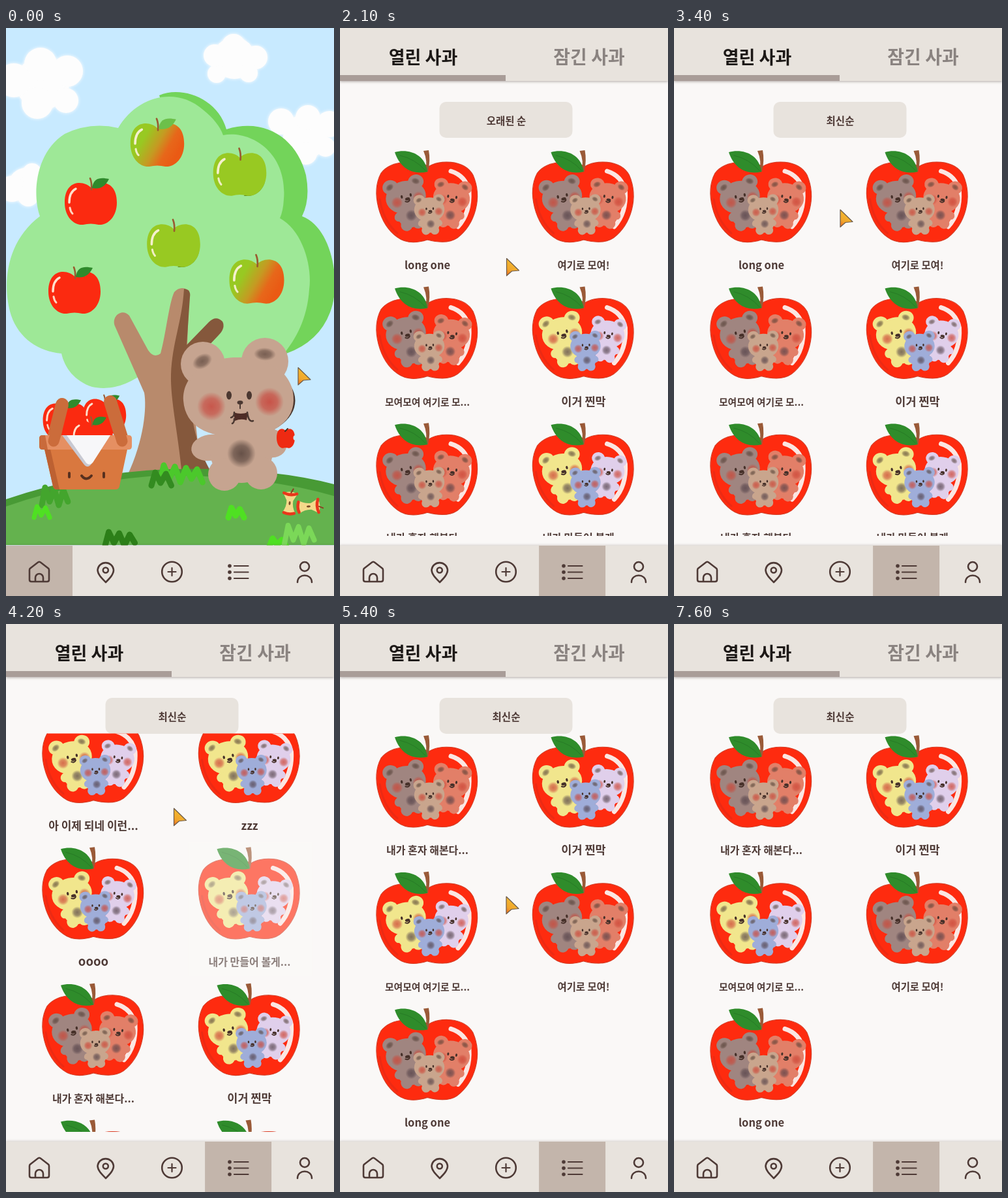
Write an HTML page with a canvas that moves like this. It is 503 px wide and 869 px high and loops after 7700 ms.

```html
<!DOCTYPE html>
<html lang="ko">
<head>
<meta charset="utf-8">
<title>사과나무</title>
<style>
html, body { margin: 0; width: 100%; height: 100%; overflow: hidden; background: #faf8f7; }
canvas { display: block; }
</style>
</head>
<body>
<canvas id="stage" width="503" height="869"></canvas>
<script>
const g = document.getElementById('stage').getContext('2d');
const LOOP = 7700, STEP = 100, TAU = Math.PI * 2;
const INK = '#4e3a36', PANEL = '#e8e3dd', PAGE = '#faf8f7';
const FONT = '"Noto Sans CJK KR", "Noto Sans", sans-serif';

function fill(d, color) { g.fillStyle = color; g.fill(new Path2D(d)); }

function line(d, color, width) {
  g.strokeStyle = color;
  g.lineWidth = width;
  g.lineCap = g.lineJoin = 'round';
  g.stroke(new Path2D(d));
}

function oval(x, y, rx, ry, color, rot = 0) {
  g.beginPath();
  g.ellipse(x, y, rx, ry, rot, 0, TAU);
  g.fillStyle = color;
  g.fill();
}

function ring(x, y, r, width) {
  g.beginPath();
  g.arc(x, y, r, 0, TAU);
  g.strokeStyle = INK;
  g.lineWidth = width;
  g.stroke();
}

// Blurred spot; rgb is "r,g,b"
function soft(x, y, rx, ry, rgb, alpha, rot = 0) {
  at(x, y, () => {
    g.rotate(rot);
    g.scale(rx, ry);
    const s = g.createRadialGradient(0, 0, 0, 0, 0, 1);
    s.addColorStop(0, `rgba(${rgb},${alpha})`);
    s.addColorStop(0.55, `rgba(${rgb},${alpha * 0.75})`);
    s.addColorStop(1, `rgba(${rgb},0)`);
    oval(0, 0, 1, 1, s);
  });
}

function at(x, y, draw) {
  g.save();
  g.translate(x, y);
  draw();
  g.restore();
}

function text(str, x, y, size, weight, color) {
  g.font = `${weight} ${size}px ${FONT}`;
  g.textAlign = 'center';
  g.textBaseline = 'alphabetic';
  g.fillStyle = color;
  g.fillText(str, x, y);
}

// ---- home page ----
function cloud(...puffs) {
  g.save();
  g.shadowColor = '#fdfdfd';
  g.shadowBlur = 5;
  for (const [x, y, r] of puffs) oval(x, y, r, r, '#fdfdfd');
  g.restore();
}

const APPLE = 'M0,-25 C10,-36 40,-38 40,-2 C40,20 26,33 12,32 Q0,29 -12,32 C-26,33 -40,20 -40,-2 C-40,-38 -10,-36 0,-25Z';

function apple(x, y, color, leaf, scale = 1) {
  at(x, y, () => {
    g.scale(scale, scale);
    let paint = color;
    if (color === 'mixed') {
      paint = g.createLinearGradient(-28, -16, 28, 16);
      paint.addColorStop(0.15, '#98c922');
      paint.addColorStop(0.5, '#c59a22');
      paint.addColorStop(0.75, '#e7671a');
      paint.addColorStop(1, '#ea5a14');
    }
    if (color === '#98c922') fill('M6,32 C26,35 36,20 38,10 L34,5Z', '#5c8a1c');
    fill(APPLE, paint);
    line('M1,-22 Q2,-32 -1,-39', '#9a5a30', 2.6);
    if (leaf) fill('M2,-24 C4,-42 18,-40 28,-38 C22,-26 14,-22 2,-24Z', leaf);
    line('M-33,-2 Q-33,-18 -23,-23', 'rgba(255,244,225,.9)', 3.5);
    line('M-32,6 Q-31,12 -28,15', 'rgba(255,244,225,.85)', 3);
  });
}

function tuft(x, y, w, h, n, color, width) {
  let d = `M${x},${y + h}`;
  for (let i = 0; i < n; i++) {
    const a = x + w * (i + 0.35) / n, b = x + w * (i + 0.85) / n;
    d += ` L${a},${y + i * 2} L${b},${y + h * (0.8 + i % 2 * 0.2)}`;
  }
  line(d, color, width);
}

function tree() {
  fill('M235,103 C270,88 325,108 338,155 C400,136 447,172 460,225 Q467,262 454,288 C500,305 515,390 497,435 Q480,480 430,498 L380,500 L300,300Z', '#73d45a');
  fill('M172,153 C200,105 260,88 302,125 C318,138 328,150 333,164 C375,156 432,190 426,262 Q425,280 420,291 C455,310 470,365 465,400 C462,445 445,475 425,500 L280,520 L215,525 C180,553 150,553 132,549 C105,540 90,520 85,498 C50,495 20,475 8,440 C-5,400 -4,330 52,288 C40,255 45,190 90,162 Q130,143 172,153Z', '#9ee897');
  fill('M186,685 C212,630 216,580 212,558 L167,456 C161,440 179,428 189,440 L218,493 Q227,506 237,498 C245,470 250,420 258,404 Q268,393 281,402 L278,484 L300,690Z', '#b88a6c');
  fill('M273,399 Q284,400 282,412 L277,485 L311,450 Q322,439 332,449 Q337,459 326,470 L290,508 Q276,540 283,580 C290,630 300,655 318,685 L270,685 C264,620 252,570 253,530 C255,480 270,450 273,399Z', '#85583c');
}

function basket() {
  apple(91, 602, '#fb2a10', '#2f8a2c', 0.86);
  apple(151, 594, '#fb2a10', '#2f8a2c', 0.83);
  apple(131, 627, '#fb2a10', '#2f8a2c', 0.82);
  line('M86,576 L73,628', '#cb6c3b', 20);
  line('M160,572 L177,626', '#cb6c3b', 20);
  fill('M58,640 H187 L174,701 Q173,706 168,706 H78 Q73,706 72,701Z', '#d9783f');
  fill('M58,640 H67 L82,706 H78 Q73,706 72,701Z', '#bd6132');
  fill('M56,623 H188 Q193,623 193,628 V640 Q193,645 188,645 H56 Q51,645 51,640 V628 Q51,623 56,623Z', '#e58f62');
  fill('M51,640 V628 Q51,623 56,623 H60 L64,645 H56 Q51,645 51,640Z', '#c96a3b');
  line('M78,615 L73,632', '#cb6c3b', 17);
  line('M172,612 L178,632', '#cb6c3b', 17);
  fill('M86,623 H160 L131,667 Q125,675 119,667Z', '#c8c9d2');
  fill('M93,623 H160 L133,665 Q127,671 122,664Z', '#f7f7f9');
  line('M97,681 V687 M150,681 V687', '#57301f', 4);
  line('M116,685 Q123,694 131,685', '#57301f', 4);
}

function bigBear() {
  const fur = '#c6a490', dark = '#4b3831';
  oval(359, 570, 84.5, 56, '#49352c');
  oval(302, 514, 34, 34, fur);
  oval(397, 510, 36, 36, fur);
  fill('M272,570 C270,530 310,503 356,504 C405,503 443,530 441,570 C440,605 405,626 357,626 C310,626 275,610 272,570Z', fur);
  oval(313, 642, 29, 20, fur, -0.15);
  oval(405, 635, 26, 22, fur, 0.3);
  oval(361, 648, 48, 48, fur);
  oval(335, 683, 25, 25, fur);
  oval(391, 681, 25, 25, fur);
  soft(301, 510, 16, 11, '95,72,62', 0.75, -0.5);
  soft(397, 499, 17, 10, '95,72,62', 0.75, 0.05);
  soft(315, 579, 22, 22, '200,74,64', 0.85);
  soft(404, 572, 22, 22, '200,74,64', 0.9);
  soft(361, 651, 22, 22, '92,72,64', 0.9);
  oval(342, 562, 4, 6.5, dark);
  oval(373, 562, 4, 6.5, dark);
  oval(359, 573, 4.5, 3, dark);
  line('M359,574 V582', dark, 2);
  fill('M349,588 Q360,592 371,588 L369,600 Q360,597 351,601Z', '#4e2c26');
  line('M345,596 Q350,595 350,588 M350,598 Q350,604 347,605', dark, 2.5);
  line('M370,588 Q372,604 379,601', dark, 2.5);
  at(429, 628, () => {
    g.scale(0.35, 0.46);
    fill(APPLE, '#ee2a12');
  });
  oval(444, 627, 3.5, 4, '#c8eaff');
  line('M428,617 L432,613', '#4b2c20', 2);
}

function core(x, y, rot) {
  at(x, y, () => {
    g.rotate(rot);
    fill('M-11,-15 Q0,-20 11,-15 L5,-4 Q4,6 10,15 Q0,20 -10,15 Q-4,5 -5,-4Z', '#f5d98a');
    line('M-10,-15 Q0,-11 10,-15', '#e9371b', 4.5);
    line('M-8,15 Q0,18 8,15', '#e9371b', 4.5);
    oval(0, 0, 1.5, 3, '#7a4a26');
    line('M1,-16 L4,-22', '#8c3f22', 2);
  });
}

function home() {
  g.fillStyle = '#c8eaff';
  g.fillRect(0, 0, 503, 869);
  cloud([56, 84, 41], [53, 55, 25], [94, 66, 24], [92, 111, 19], [48, 115, 24], [12, 80, 26]);
  cloud([350, 46, 32], [349, 27, 18], [383, 45, 18], [372, 69, 14], [323, 70, 14], [320, 42, 17]);
  cloud([459, 166, 34], [463, 137, 19], [422, 143, 20], [496, 147, 20], [460, 192, 17], [490, 182, 15]);
  cloud([30, 240, 26], [40, 222, 15], [9, 246, 20], [34, 257, 16]);
  tree();
  apple(232, 179, 'mixed', '#6cc04a', 1.03);
  apple(358.5, 224, '#98c922', null, 1.02);
  apple(130, 269, '#fb2a10', '#2f8a2c');
  apple(257, 333, '#98c922', null, 1.02);
  apple(384.5, 388, 'mixed', null, 1.05);
  apple(105, 405, '#fb2a10', '#2f8a2c');

  fill('M0,721 Q120,680 250,675 Q400,671 503,698 V791 H0Z', '#489a35');
  fill('M0,732 Q120,690 250,684 Q400,686 503,716 V791 H0Z', '#64b24e');
  tuft(236, 669, 68, 26, 4, '#4bc82b', 9);
  tuft(223, 680, 33, 20, 2, '#338b20', 9);
  tuft(55, 703, 42, 27, 3, '#43a52d', 9);
  tuft(43, 732, 26, 17, 2, '#4fe022', 7);
  tuft(341, 734, 26, 15, 2, '#4fe022', 9);
  tuft(152, 771, 48, 21, 3, '#2c7f18', 9);
  tuft(404, 781, 28, 12, 2, '#4fe022', 9);
  tuft(427, 761, 48, 28, 3, '#7bd858', 8);
  basket();
  bigBear();
  core(435, 727, 0.08);
  core(464, 732, 1.5);
}

// ---- list page ----
function bear(x, y, scale, rot, color) {
  at(x, y, () => {
    g.rotate(rot);
    g.scale(scale, scale);
    oval(-20, -20, 12, 11, color);
    oval(20, -20, 12, 11, color);
    oval(0, 0, 31, 25, color);
    oval(1, 27, 20, 20, color);
    oval(-16, 27, 8, 7, color, -0.5);
    oval(18, 27, 8, 7, color, 0.5);
    oval(-8, 42, 9, 9, color);
    oval(10, 42, 9, 9, color);
    soft(-21, -20, 7, 5, '80,60,50', 0.65, -0.5);
    soft(20, -21, 7, 5, '80,60,50', 0.65, 0.5);
    soft(-15, 5, 9, 9, '205,70,55', 0.75);
    soft(19, 4, 9, 9, '205,70,55', 0.75);
    soft(2, 29, 9, 9, '80,62,70', 0.7);
    oval(-6, -2, 1.7, 2.6, '#463029');
    oval(8, -2, 1.7, 2.6, '#463029');
    oval(2, 3, 3.8, 2.3, '#463029');
    line('M-2,6 Q2,9 5,5', '#463029', 2);
  });
}

const FURS = { b: ['#a08580', '#e27f68', '#c9a58d'], y: ['#f1e68d', '#e0cfeb', '#9fadd9'] };

function card(kind) {
  const [left, right, front] = FURS[kind];
  const body = 'M136,212 C150,202 190,200 204,225 C219,260 207,300 180,321 C167,330 150,328 134,324 C115,330 100,329 88,320 C60,300 47,252 63,222 C80,200 120,203 136,212Z';
  fill(body, '#fe2b0f');
  line(body, '#d83a22', 1.2);
  line('M61,262 Q66,295 88,314', '#ec2a14', 3);
  line('M170,219 Q193,226 198,250 Q200,283 181,304', '#fbe6e2', 7);
  fill('M128,188 L136,187 Q139,203 135,220 L131,220 Q135,204 128,188Z', '#9a5a38');
  fill('M84,190 C105,184 131,193 134,220 C110,225 92,214 84,190Z', '#2f8c2b');
  line('M92,195 Q115,200 131,218', '#277a26', 1);
  bear(101, 259, 1, -0.22, left);
  bear(171, 260, kind === 'b' ? 0.91 : 0.84, 0.14, right);
  bear(137, 278, 0.75, -0.03, front);
}

// Label and its type size, oldest first
const ITEMS = [
  ['long one', 16.5], ['여기로 모여!', 15.4], ['모여모여 여기로 모...', 14.8],
  ['이거 찐막', 17.5], ['내가 혼자 해본다...', 16], ['내가 만들어 볼게...', 16],
  ['oooo', 18.5], ['zzz', 17], ['아 이제 되네 이런...', 17]
];
const PITCH = 208.6, FADED = 5;

function list(t) {
  const newest = t >= 3500;
  const kinds = newest ? 'yyyybyybb' : 'bbbybyyyy';
  const scroll = 434 * ease((t - 4000) / 904);
  g.save();
  g.beginPath();
  g.rect(0, 167.5, 503, 609.5);
  g.clip();
  for (let i = 0; i < ITEMS.length; i++) {
    const id = newest ? ITEMS.length - 1 - i : i;
    const y = Math.floor(i / 2) * PITCH - scroll;
    if (y < -220 || y > 600) continue;
    at(i % 2 * 239.5, y, () => {
      card(kinds[i]);
      text(ITEMS[id][0], 134, 369, ITEMS[id][1], 700, INK);
      if (id === FADED && t >= 4100 && t < 4500) {
        g.globalAlpha = 0.36;
        g.fillStyle = PAGE;
        g.fillRect(40, 180, 190, 205);
      }
    });
  }
  g.restore();
}

function listPage(t) {
  g.fillStyle = PAGE;
  g.fillRect(0, 0, 503, 869);
  g.save();
  g.shadowColor = 'rgba(60,45,40,.4)';
  g.shadowBlur = 4;
  g.shadowOffsetY = 1;
  g.fillStyle = PANEL;
  g.fillRect(0, 0, 503, 81);
  g.restore();
  g.fillStyle = '#a99d98';
  g.fillRect(0, 72, 254, 9);
  text('열린 사과', 127.5, 55, 27, 900, '#1c1816');
  text('잠긴 사과', 382, 55, 28, 700, '#8a8380');
  g.beginPath();
  g.roundRect(152.5, 113, 204, 55, 10);
  g.fillStyle = PANEL;
  g.fill();
  text(t < 3000 ? '오래된 순' : '최신순', 255, 148, 15.5, 700, INK);
  list(t);
}

function navBar(active) {
  g.save();
  g.shadowColor = 'rgba(60,45,40,.35)';
  g.shadowBlur = 4;
  g.fillStyle = PANEL;
  g.fillRect(0, 791.5, 503, 78);
  g.restore();
  g.fillStyle = '#c3b5ab';
  g.fillRect(active * 101.7, 792, 102, 77);
  const w = 2.6;
  line('M36,829 Q36,827 38,826 L49,817.5 Q51,816 53,817.5 L64,826 Q66,827 66,829 V844 Q66,847 63,847 H39 Q36,847 36,844Z M45,847 V841 A6,6 0 0 1 57,841 V847', INK, w);
  line('M153,848 C147,842 140.5,836 140.5,829 A12.3,12 0 0 1 165,829 C165,836 159,842 153,848Z', INK, w);
  ring(152.8, 829.5, 4, w);
  ring(254.5, 832, 15.3, w);
  line('M248.5,832 H260.5 M254.5,826 V838', INK, 2.2);
  for (const y of [823, 832.5, 842]) {
    oval(343, y, 2.8, 2.8, INK);
    line(`M350,${y} H371.5`, INK, 2.2);
  }
  ring(458, 824, 7, w);
  line('M447,848 C447,834 469,834 469,848', INK, w);
}

// ---- pointer ----
const PATH = [
  [0, 447.5, 519], [500, 356, 828], [600, 356, 828], [800, 148.5, 628],
  [1600, 255, 400], [2100, 255, 352], [2400, 255, 340], [2800, 255, 143],
  [3000, 255, 143], [3400, 254.5, 277.5], [4200, 257, 281.5], [5400, 254.5, 416.5]
];

function ease(p) {
  p = Math.min(1, Math.max(0, p));
  return p * p * (3 - 2 * p);
}

function pointer(t) {
  if (t >= 6500) return;
  let i = 0;
  while (i < PATH.length - 2 && PATH[i + 1][0] <= t) i++;
  const [t0, x0, y0] = PATH[i], [t1, x1, y1] = PATH[i + 1];
  const p = ease((t - t0) / (t1 - t0));
  at(x0 + (x1 - x0) * p, y0 + (y1 - y0) * p, () => {
    const paint = g.createLinearGradient(12, 6, 0, 26);
    paint.addColorStop(0, '#f3b92f');
    paint.addColorStop(0.6, '#f0a52c');
    paint.addColorStop(1, '#ee6a1f');
    const d = 'M0.5,0.5 L19.5,19 L8.5,20 L0.5,27Z';
    fill(d, paint);
    line(d, '#6b5a4a', 1.2);
  });
}

function draw(t) {
  if (t < 600) {
    home();
  } else if (t < 1000) {
    g.fillStyle = '#f1f1f1';
    g.fillRect(0, 0, 503, 869);
  } else {
    listPage(t);
  }
  navBar(t < 600 ? 0 : 3);
  pointer(t);
}

const start = performance.now();
let shown = -1;

function tick() {
  const t = Math.floor((performance.now() - start) % LOOP / STEP) * STEP;
  if (t !== shown) {
    draw(t);
    shown = t;
  }
  requestAnimationFrame(tick);
}
tick();
</script>
</body>
</html>
```
